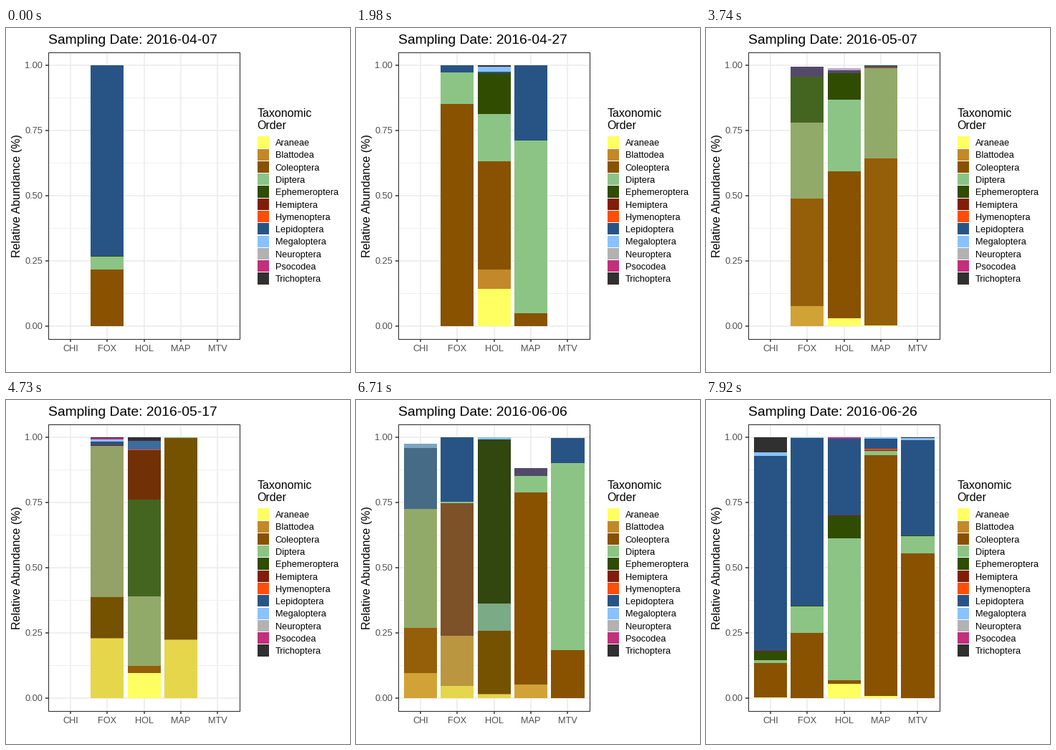
These frames come from a looping animation (480x480 px, 8000 ms). A matplotlib script:

```python
import numpy as np
import matplotlib.pyplot as plt
from matplotlib.animation import FuncAnimation
from matplotlib.collections import PolyCollection
from matplotlib.colors import to_rgb
from matplotlib.patches import Rectangle

plt.rcParams["font.family"] = "Liberation Sans"

SIZE, DPI = 480, 96
TICK = 20              # ms per drawn frame
LOOP = 8000
STEP = 110             # ms between visible changes
HOLD, CYCLE = 7, 9     # steps at rest, steps per sampling date
EASED = (2 / 9, 7 / 9)  # quadratic in-out at one and two thirds

ORDERS = {
    "A": ("Araneae", "#FFFF61"), "B": ("Blattodea", "#C3882A"),
    "C": ("Coleoptera", "#885200"), "D": ("Diptera", "#8CC485"),
    "E": ("Ephemeroptera", "#304C00"), "H": ("Hemiptera", "#821E08"),
    "Y": ("Hymenoptera", "#FF4E08"), "L": ("Lepidoptera", "#285485"),
    "M": ("Megaloptera", "#8AC2FF"), "N": ("Neuroptera", "#B2B2B2"),
    "P": ("Psocodea", "#C22F7B"), "T": ("Trichoptera", "#303030"),
}
DATES = ["04-07", "04-17", "04-27", "05-07", "05-17",
         "05-27", "06-06", "06-16", "06-26"]

# Upper edge of each stacked band, one dict per sampling date.
NONE = {}
CHI = [NONE] * 6 + [
    dict(B=.12, C=.24, D=.80, L=.98, M=1),
    dict(A=.005, B=.365, C=.467, D=.882, E=.89, Y=.912, L=.988, M=.994, T=1),
    dict(A=.003, C=.135, D=.146, E=.178, H=.182, L=.928, M=.942, T=1),
]
FOX = [
    dict(C=.217, D=.266, E=.27, L=1),
    dict(C=.55, D=.72, L=1),
    dict(C=.852, D=.973, L=1),
    dict(B=.095, C=.622, D=.942, E=.953, L=1),
    dict(A=.013, B=.015, C=.211, D=.967, H=.969, L=.984, M=.99, P=.997, T=1),
    dict(C=.98, D=.983, E=.997, H=1),
    dict(A=.058, B=.062, C=.748, D=.752, L=1),
    dict(C=.003, D=.854, L=1),
    dict(C=.25, D=.35, E=.353, L=.997, M=1),
]
HOL = [
    NONE,
    dict(A=.06, C=.5, D=.76, E=.95, L=1),
    dict(A=.143, B=.217, C=.632, D=.813, E=.968, L=.976, M=.995, T=1),
    dict(A=.004, C=.718, D=.977, E=.981, L=.991, M=1),
    dict(A=.119, C=.153, D=.486, E=.925, H=.939, Y=.943, L=.986, T=1),
    dict(A=.016, B=.017, C=.052, D=.181, E=.99, L=.992, M=1),
    dict(A=.016, B=.017, C=.052, D=.181, E=.99, L=.992, M=1),
    dict(C=.005, D=.01, E=.983, L=.995, T=1),
    dict(A=.055, C=.067, D=.613, E=.697, H=.701, L=.994, P=1),
]
MAP = [
    NONE,
    dict(C=.2, D=.7, L=1),
    dict(C=.049, D=.712, L=1),
    dict(A=.001, C=.825, D=.985, H=.993, L=1),
    dict(A=.004, B=.005, C=.997, D=1),
    dict(C=.985, D=.997, E=1),
    dict(B=.063, C=.957, D=.963, L=1),
    dict(A=.009, C=.19, D=.456, H=.462, L=.997, M=1),
    dict(A=.007, C=.931, D=.947, H=.949, Y=.956, L=.995, M=1),
]
MTV = [NONE] * 6 + [
    dict(C=.2, D=.88, L=1),
    dict(C=.131, D=.975, L=.991, M=1),
    dict(C=.555, D=.62, E=.623, L=.989, M=.996, T=1),
]
SITES = {"CHI": CHI, "FOX": FOX, "HOL": HOL, "MAP": MAP, "MTV": MTV}

# Panel geometry in pixels, y pointing down.
LEFT, RIGHT, TOP, BOTTOM = 59, 326.3, 34, 433.7
UNIT = (RIGHT - LEFT) / 5.2
BAR = 0.9 * UNIT


def site_x(i):
    return LEFT + (0.6 + i) * UNIT


def value_y(v):
    return 415.8 - 364 * v


XYZ = np.array([[.4124, .3576, .1805], [.2126, .7152, .0722],
                [.0193, .1192, .9505]])
WHITE = XYZ.sum(axis=1)


def to_lab(rgb):
    rgb = np.array(rgb)
    lin = np.where(rgb > .04045, ((rgb + .055) / 1.055) ** 2.4, rgb / 12.92)
    v = XYZ @ lin / WHITE
    fx, fy, fz = np.where(v > .008856, np.cbrt(v), 7.787 * v + 16 / 116)
    return np.array([116 * fy - 16, 500 * (fx - fy), 200 * (fy - fz)])


def from_lab(lab):
    fy = (lab[0] + 16) / 116
    f = np.array([fy + lab[1] / 500, fy, fy - lab[2] / 200])
    v = np.where(f > .2069, f ** 3, (f - 16 / 116) / 7.787)
    lin = np.clip(np.linalg.solve(XYZ, v * WHITE), 0, 1)
    return np.where(lin > .0031308, 1.055 * lin ** (1 / 2.4) - .055,
                    12.92 * lin)


RGB = {key: to_rgb(color) for key, (_, color) in ORDERS.items()}
LAB = {key: to_lab(rgb) for key, rgb in RGB.items()}


def spans(tops):
    """Turn upper edges into (key, low, high) bands."""
    lows = [0, *tops.values()]
    return [(key, low, high) for (key, high), low in zip(tops.items(), lows)]


def blend(a, b, t):
    low, high = (p + (q - p) * t for p, q in zip(a[1:], b[1:]))
    if a[0] == b[0]:
        return low, high, RGB[a[0]]
    return low, high, from_lab(LAB[a[0]] * (1 - t) + LAB[b[0]] * t)


def bands(series, i, t):
    """Bands pair up from the bottom; surplus old ones wait, new ones pop in."""
    old = spans(series[i])
    new = spans(series[i + 1]) if t else old
    moving = [blend(a, b, t) for a, b in zip(old, new)]
    waiting = [(low, high, RGB[key]) for key, low, high in old[len(new):]]
    return moving + waiting


fig = plt.figure(figsize=(SIZE / DPI, SIZE / DPI), dpi=DPI, facecolor="white")
ax = fig.add_axes([0, 0, 1, 1])
ax.set_xlim(0, SIZE)
ax.set_ylim(SIZE, 0)
ax.axis("off")


def line(xs, ys, color, px, z):
    ax.plot(xs, ys, color=color, lw=px * 72 / DPI, zorder=z,
            solid_capstyle="butt")


def label(x, y, text, px, color="black", **kw):
    return ax.text(x, y, text, fontsize=px * 72 / DPI, color=color,
                   va="baseline", **kw)


def draw_panel():
    grid, dark, grey = "#EBEBEB", "#333333", "#4D4D4D"
    for k in range(4):
        y = value_y((k + .5) / 4)
        line([LEFT, RIGHT], [y, y], grid, .8, 0)
    for k in range(5):
        y = value_y(k / 4)
        line([LEFT, RIGHT], [y, y], grid, 1.55, 1)
        line([LEFT - 4, LEFT], [y, y], dark, 1.5, 4)
        label(51.3, y + 4.6, f"{k / 4:.2f}", 12.8, grey, ha="right")
    for i, name in enumerate(SITES):
        x = site_x(i)
        line([x, x], [TOP, BOTTOM], grid, 1.55, 1)
        line([x, x], [BOTTOM, BOTTOM + 4], dark, 1.5, 4)
        label(x, 451, name, 12.8, grey, ha="center")
    ax.add_patch(Rectangle((LEFT, TOP), RIGHT - LEFT, BOTTOM - TOP,
                           fill=False, ec=dark, lw=1.1 * 72 / DPI, zorder=5))
    label(19.6, 234.5, "Relative Abundance (%)", 16, rotation=90,
          ha="center", rotation_mode="anchor")


def draw_legend():
    label(350.5, 124, "Taxonomic", 16)
    label(350.5, 141, "Order", 16)
    for i, (name, color) in enumerate(ORDERS.values()):
        y = 159.4 + 17.28 * i
        ax.add_patch(Rectangle((351, y - 8.1), 16.2, 16.2, fc=color, lw=0))
        label(375.7, y + 4.7, name, 12.8)


draw_panel()
draw_legend()
title = label(58.6, 22, "", 19.2)
bars = PolyCollection([], linewidths=0, zorder=3)
ax.add_collection(bars, autolim=False)


def update(frame):
    step = (frame * TICK + TICK // 2) // STEP
    i, phase = divmod(step, CYCLE)
    t = EASED[phase - HOLD] if phase >= HOLD else 0
    verts, colors = [], []
    for k, series in enumerate(SITES.values()):
        x0, x1 = site_x(k) - BAR / 2, site_x(k) + BAR / 2
        for low, high, color in bands(series, i, t):
            y0, y1 = value_y(low), value_y(high)
            verts.append([(x0, y0), (x1, y0), (x1, y1), (x0, y1)])
            colors.append(color)
    bars.set_verts(verts)
    bars.set_facecolor(colors)
    title.set_text("Sampling Date: 2016-" + DATES[i + (t > .5)])
    return bars, title


anim = FuncAnimation(fig, update, frames=LOOP // TICK, interval=TICK,
                     repeat=True, repeat_delay=0)
plt.show()
```
